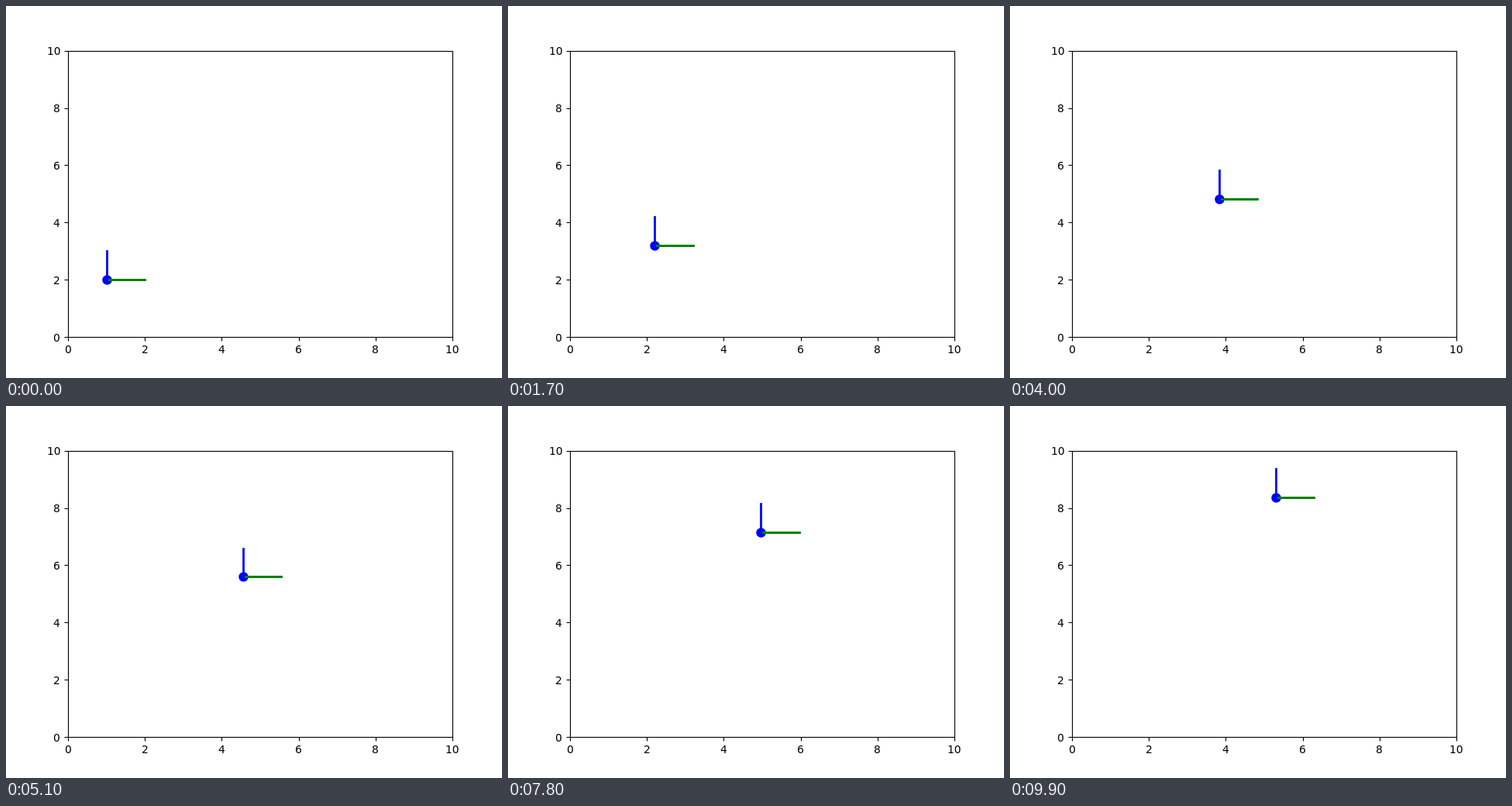
These frames come from a looping animation (640x480 px, 10 s). An HTML page with a canvas:

```html
<!DOCTYPE html>
<html>
<head>
<meta charset="utf-8">
<style>
html, body { margin: 0; width: 100%; height: 100%; overflow: hidden; background: #fff; }
canvas { display: block; }
</style>
</head>
<body>
<canvas id="stage" width="640" height="480"></canvas>
<script>
const ctx = document.getElementById('stage').getContext('2d');
const STEP = 100, STEPS = 100, TURN = 50;

const toX = x => 80 + 49.6 * x;
const toY = y => 427.2 - 36.96 * y;
const snap = v => Math.floor(v + 0.5) + 0.5;

function line(x1, y1, x2, y2, color, width, cap) {
  ctx.strokeStyle = color;
  ctx.lineWidth = width;
  ctx.lineCap = cap;
  ctx.beginPath();
  ctx.moveTo(x1, y1);
  ctx.lineTo(x2, y2);
  ctx.stroke();
}

function axes() {
  ctx.strokeStyle = ctx.fillStyle = '#000';
  ctx.lineWidth = 1.11;
  ctx.strokeRect(80.5, 58.5, 496, 369);
  ctx.font = '13.89px "DejaVu Sans", sans-serif';
  for (let v = 0; v <= 10; v += 2) {
    const x = toX(v), y = toY(v), w = ctx.measureText(v).width;
    line(snap(x), 427.5, snap(x), 432.5, '#000', 1.11, 'butt');
    line(75.5, snap(y), 80.5, snap(y), '#000', 1.11, 'butt');
    ctx.fillText(v, Math.round(x - w / 2), 448);
    ctx.fillText(v, Math.round(70.28 - w), Math.round(y + 5.4));
  }
}

// Heads out at 45 degrees, then turns to a steeper, slower course.
function position(n) {
  const a = Math.min(n, TURN) * 0.1 * Math.SQRT1_2;
  const b = Math.max(n - TURN, 0) * 0.1 / Math.sqrt(3);
  return [1 + a + b * Math.tan(Math.PI / 12), 2 + a + b];
}

function draw(time) {
  const [px, py] = position(Math.floor(time / STEP) % STEPS);
  const x = snap(toX(px)), y = snap(toY(py));
  ctx.fillStyle = '#fff';
  ctx.fillRect(0, 0, 640, 480);
  axes();
  ctx.fillStyle = '#00f';
  ctx.beginPath();
  ctx.arc(x, y, 6.25, 0, 2 * Math.PI);
  ctx.fill();
  line(x, y, snap(toX(px + 1)), y, '#008000', 2.78, 'square');
  line(x, y, x, snap(toY(py + 1)), '#00f', 2.78, 'square');
}

const start = performance.now();
function tick() {
  draw(performance.now() - start);
  requestAnimationFrame(tick);
}
tick();
</script>
</body>
</html>
```
